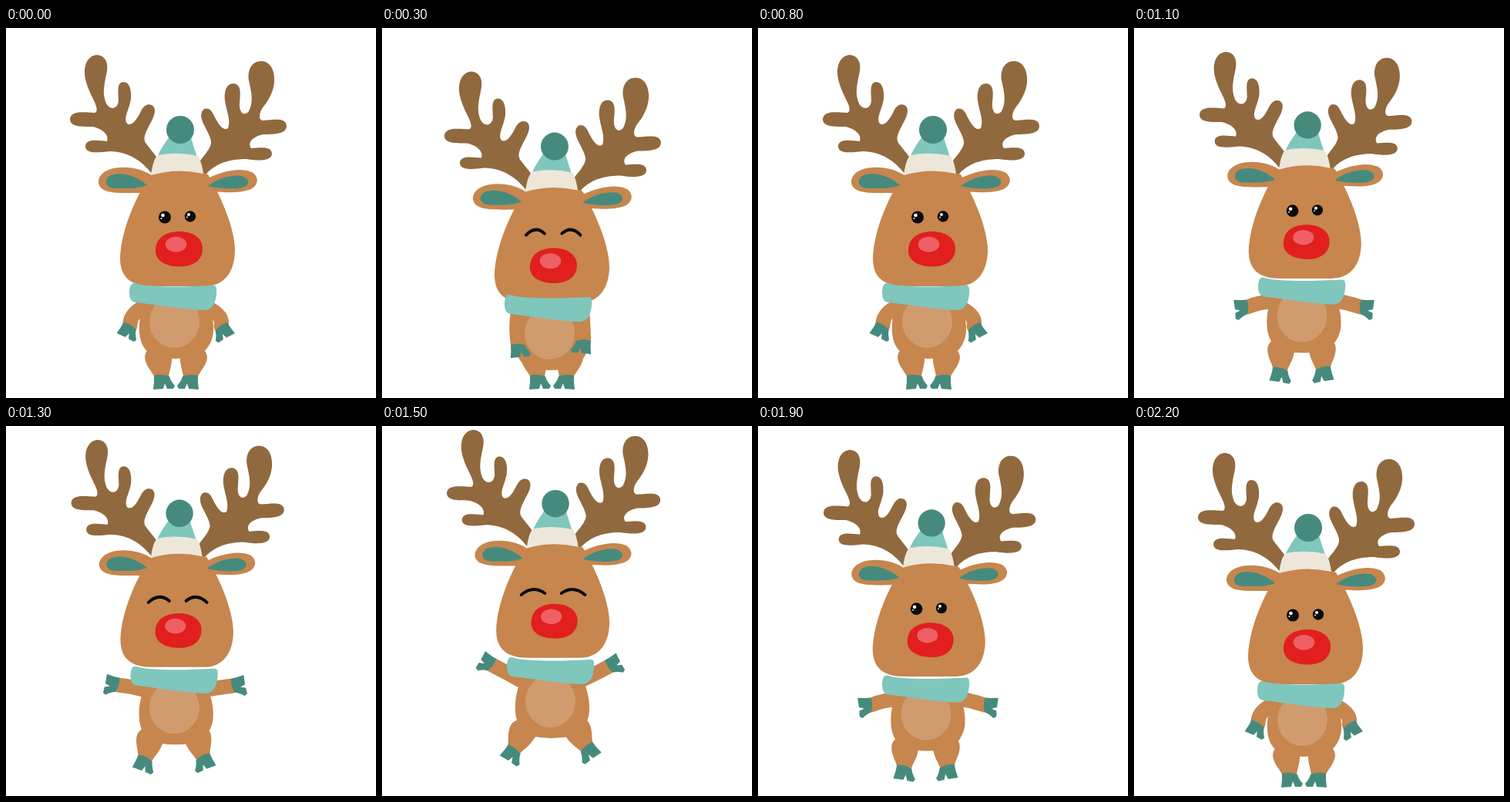
An HTML page that plays this animation: 480x480 px, repeating every 2.3 s.

```html
<!DOCTYPE html>
<html lang="en">
<head>
<meta charset="utf-8">
<title>Jumping reindeer</title>
<style>
html, body { margin: 0; width: 100%; height: 100%; overflow: hidden; background: #fff; }
svg { display: block; width: 100%; height: 100%; }
.fur { fill: #c6864e; }
.horn { fill: #91693e; }
.teal { fill: #468a7e; }
.mint { fill: #7fc6bd; }
.limb { fill: none; stroke: #c6864e; stroke-width: 19; stroke-linecap: round; }
.lid { fill: none; stroke: #0a0a0a; stroke-width: 4; stroke-linecap: round; }
</style>
</head>
<body>
<svg viewBox="0 0 480 480">
  <defs>
    <path id="hoof" class="teal" d="M-10 0Q0 -3 10 1Q11 6 17 13L15 17L7 17L4 10L2 17L-11 18L-10 8Z"/>
    <g id="leg">
      <path class="fur" d="M-10 1C-13 -6 -22 -14 -22 -25C-20 -36 -12 -38 0 -38L13 -34L13 -22C13 -12 10 -8 9 2Z"/>
      <use href="#hoof"/>
    </g>
  </defs>
  <g id="deer">
    <use id="legL" href="#leg"/>
    <use id="legR" href="#leg"/>
    <g id="body">
      <path class="fur" d="M183 345C176 362 172 378 173 394C174 412 182 420 192 426Q220 432 248 426C260 420 268 408 269 394C270 376 264 360 258 345Z"/>
      <ellipse cx="218.5" cy="381" rx="32.5" ry="34" fill="#d09c6f"/>
    </g>
    <path id="armL" class="limb"/>
    <path id="armR" class="limb"/>
    <use id="handL" href="#hoof"/>
    <use id="handR" href="#hoof"/>
    <g id="head">
      <path class="horn" d="M190 190C176 172 160 161 135 160C116 162 103 163 103 153C104 143 120 146 131 147C134 139 126 131 112 128C96 128 83 128 83 118C84 107 100 109 115 110C121 108 116 98 112 90C106 78 102 66 102 58C102 42 110 35 119 35C128 36 133 44 131 56C128 72 124 84 130 98C135 107 145 106 146 94C146 84 143 71 152 70C161 70 163 82 162 92C160 106 152 116 157 124C164 128 170 118 175 108C179 100 184 98 189 100C196 104 193 114 187 124C182 134 177 142 181 149C186 156 192 162 197 170Z"/>
      <path class="horn" d="M256 194C268 178 285 170 312 170C330 173 345 172 345 163C345 153 330 155 318 156C313 148 320 141 334 138C350 138 364 137 364 127C363 116 348 119 334 120C327 120 328 110 334 102C344 90 349 76 348 64C347 50 340 43 331 43C319 43 313 54 315 68C319 86 321 96 315 108C308 116 302 108 303 98C304 86 306 73 295 72C285 72 283 84 284 94C286 108 292 120 288 130C282 134 276 126 270 114C267 106 262 103 257 105C251 110 253 118 257 126C261 134 267 144 266 150C264 158 258 164 252 172Z"/>
      <path class="fur" d="M190 192C178 182 150 177 133 184C118 190 116 204 127 210C136 215 155 214 178 214Z"/>
      <path class="fur" d="M260 196C278 186 304 180 319 187C330 194 327 206 315 210C300 215 285 213 266 212Z"/>
      <path class="fur" d="M188 190C170 215 149 262 148 298C148 322 160 335 190 335L258 335C284 335 297 315 297 288C296 255 276 214 262 190Q226 178 188 190Z"/>
      <path class="teal" d="M183 204C170 192 150 186 136 191C126 196 128 208 142 208C156 208 170 209 183 204Z"/>
      <path class="teal" d="M262 205C275 195 292 190 306 192C318 196 317 206 302 208C288 209 274 208 262 205Z"/>
      <path class="mint" d="M196 168C201 155 210 144 214 138L240 142C242 150 246 160 248 168Z"/>
      <path fill="#ede7d9" d="M188 191C190 178 192 169 197 165Q222 160 249 166C252 170 255 180 256 189Q222 181 188 191Z"/>
      <circle class="teal" cx="226" cy="132" r="18"/>
      <g id="eyes">
        <circle cx="206" cy="245.5" r="8" fill="#0a0a0a"/>
        <circle cx="239" cy="244.5" r="7.2" fill="#0a0a0a"/>
        <g fill="#fff">
          <circle cx="203.5" cy="243" r="2.3"/><circle cx="201.5" cy="247" r="1"/>
          <circle cx="237" cy="242" r="2"/><circle cx="235" cy="245.5" r=".9"/>
        </g>
      </g>
      <g id="lids"><path id="lidL" class="lid"/><path id="lidR" class="lid"/></g>
      <path fill="#e01f1e" d="M194 289C194 273 206 264 225 264C243 264 255 273 255 286C255 301 243 309.500 226 309.500C207 309.500 194 302 194 289Z"/>
      <ellipse cx="220.500" cy="280.700" rx="13.800" ry="10" fill="#ee6064"/>
    </g>
    <path id="scarf" class="mint" d="M167 331C185 337 230 336 270 334Q274 334 273 345C272 356 268 367 256 366C230 365 195 359 168 356Q160 355 160 344Q160 330 167 331Z"/>
  </g>
</svg>
<script>
const LOOP = 2300, STEP = 100;

// Each part: stand, crouch, take-off, top of the jump
const parts = {
  head:  [[1, 0, 0], [1, -2, 21], [.98, 3.7, -3.4], [.986, 2.2, -29.5]],
  scarf: [[0, 0], [-1, 14.5], [1, -7.5], [2, -31]],
  body:  [[0, 0], [-1, 14.5], [-.5, -7.5], [0, -24]],
  legL:  [[202, 451, 0], [202, 451, 0], [190, 442, 12], [172, 419, 35]],
  legR:  [[239, 451, 0], [239, 451, 0], [245, 441, -12], [265, 416, -38]],
  // shoulder, elbow, wrist, hand angle
  armL:  [[178, 362, 160, 372, 161, 386, 29], [176, 372, 173, 390, 176, 410, -2],
          [178, 355, 165, 355, 147, 362, 86], [178, 329, 164, 321, 143, 310, 122]],
  armR:  [[260, 362, 283, 373, 279, 387, -32], [260, 372, 262, 388, 262, 405, 2],
          [262, 354, 276, 356, 294, 362, -86], [258, 330, 274, 323, 294, 312, -120]],
  // left centre, right centre, height, half width
  lids:  [[201, 247.5, 245, 12], [201, 247.5, 245, 12], [201, 247.5, 245, 12], [196.5, 249.3, 250, 15.5]]
};

const tracks = {
  crouch: [[0, 0], [400, 1.22], [760, 0]],
  lift:   [[0, 0], [800, 0], [1100, 1], [1500, 0], [1900, 1], [2200, 0]],
  top:    [[0, 0], [1100, 0], [1500, 1], [1900, 0]],
  sway:   [[0, 0], [550, 0], [700, 1.3], [800, 1], [1100, 0]]
};

const $ = id => document.getElementById(id);

function at(track, t) {
  const i = track.findIndex(k => k[0] > t);
  if (i < 0) return track[track.length - 1][1];
  const [t0, a] = track[i - 1], [t1, b] = track[i];
  const u = (t - t0) / (t1 - t0);
  return a + (b - a) * u * u * (3 - 2 * u);
}

const mix = (poses, w) =>
  poses[0].map((v, i) => v + w.reduce((sum, k, j) => sum + k * (poses[j + 1][i] - v), 0));

const move = (id, s) => $(id).setAttribute('transform', s);
const spot = (x, y, a, flip) => `translate(${x} ${y}) rotate(${a})` + (flip ? ' scale(-1 1)' : '');

function draw(t) {
  const w = ['crouch', 'lift', 'top'].map(k => at(tracks[k], t));
  const p = {};
  for (const k in parts) p[k] = mix(parts[k], w);

  move('deer', `translate(${at(tracks.sway, t)} 0)`);
  const [s, hx, hy] = p.head;
  move('head', `translate(${hx} ${hy}) scale(${s})`);
  move('scarf', `translate(${p.scarf})`);
  move('body', `translate(${p.body})`);

  for (const side of 'LR') {
    const flip = side === 'R';
    move('leg' + side, spot(...p['leg' + side], flip));
    const [sx, sy, ex, ey, x, y, a] = p['arm' + side];
    $('arm' + side).setAttribute('d', `M${sx} ${sy}Q${ex} ${ey} ${x} ${y}`);
    move('hand' + side, spot(x, y, a, flip) + ' scale(.95)');
  }

  const [lx, rx, ly, hw] = p.lids;
  $('lidL').setAttribute('d', `M${lx - hw} ${ly + 2}Q${lx} ${ly - 11} ${lx + hw} ${ly}`);
  $('lidR').setAttribute('d', `M${rx - hw} ${ly}Q${rx} ${ly - 11} ${rx + hw} ${ly + 2}`);
  const shut = w[0] > .4 || w[2] > .4;
  $('eyes').style.display = shut ? 'none' : '';
  $('lids').style.display = shut ? '' : 'none';
}

const start = performance.now();
function tick() {
  const t = (performance.now() - start) % LOOP;
  draw(Math.floor(t / STEP) * STEP);
  requestAnimationFrame(tick);
}
draw(0);
requestAnimationFrame(tick);
</script>
</body>
</html>
```
